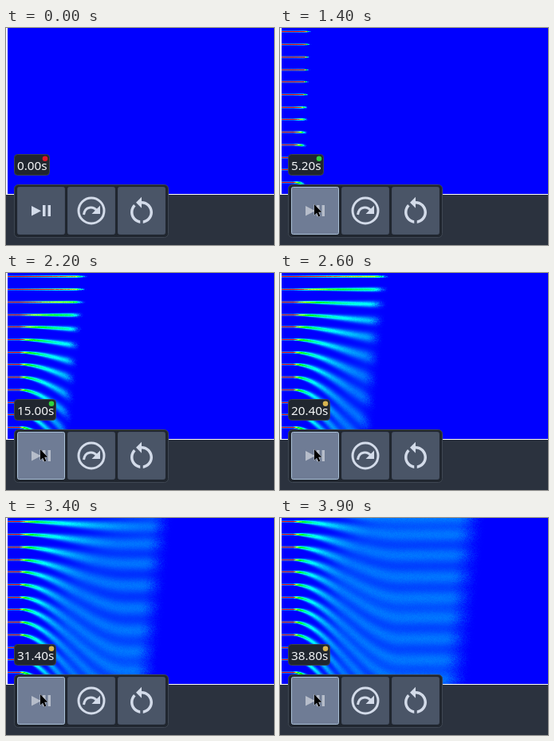
Write an HTML page with a canvas that moves like this. It is 336 px wide and 272 px high and loops after 4000 ms.

```html
<!DOCTYPE html>
<html lang="en">
<head>
<meta charset="utf-8">
<style>
  html, body { margin: 0; width: 100%; height: 100%; overflow: hidden; background: #2b323e; }
  canvas { display: block; width: 336px; height: 272px; }
</style>
</head>
<body>
<canvas id="stage" width="336" height="272"></canvas>
<script>
const ctx = document.getElementById('stage').getContext('2d');
const FIELD_W = 334, FIELD_H = 208;
const field = ctx.createImageData(FIELD_W, FIELD_H);
const ICON = '#d3dbe9';
// Inlets down the left edge; the first two lie above the visible area
const inlets = Array.from({ length: 15 }, (_, i) => Math.round(4.35 + (i - 2) * 15.72));
// [loop seconds, simulated seconds]
const clock = [[0, 0], [0.9, 0], [1.4, 5.2], [2.2, 15], [3, 25.8], [3.4, 31.4], [3.9, 38.8]];
const restart = new Path2D('M12 5V2L8 6l4 4V7c3.31 0 6 2.69 6 6 0 2.97-2.17 5.43-5 5.91v2.02c3.95-.49 7-3.85 7-7.93 0-4.42-3.58-8-8-8zM6 13c0-1.65.67-3.15 1.76-4.24L6.34 7.34C4.9 8.79 4 10.79 4 13c0 4.08 3.05 7.44 7 7.93v-2.02c-2.83-.48-5-2.94-5-5.91z');
const pointer = new Path2D('M0 0V13.5L3 10.7L5.1 15.4L7.3 14.4L5.3 9.8H9.2Z');

const clamp = (v, lo = 0, hi = 1) => Math.min(hi, Math.max(lo, v));
const smooth = (a, b, v) => { const u = clamp((v - a) / (b - a)); return u * u * (3 - 2 * u); };
const grain = (x, y) => { const n = Math.sin(x * 12.99 + y * 78.23) * 43758.5; return n - Math.floor(n) - 0.5; };

function simTime(t) {
  const i = Math.max(1, clock.findIndex(p => p[0] >= t - 1e-6));
  const [a, va] = clock[i - 1], [b, vb] = clock[i];
  return Math.round((va + (vb - va) * (t - a) / (b - a)) * 5) / 5;
}

// Centre, spread and peak of each jet where it crosses column x
function jetsAt(x, time) {
  const bend = smooth(15, 150, x);
  const sink = 17 * (Math.max(0, time - 20) / 19) ** 2;
  return inlets.map(y0 => {
    const pull = 0.65 * clamp((time - 15) / 20 + (y0 - 50) / 120);
    const mixing = clamp((time - 20) / 20 + y0 / 95, 0.06, 1.5);
    const width = Math.min(5.2, 0.45 + 0.05 * mixing * Math.max(0, x - 14));
    return {
      y: y0 + bend * (sink + pull * (y0 - 4)),
      spread: width * (1 + bend * pull),
      peak: 0.58 / width
    };
  });
}

function drawField(time) {
  const px = field.data;
  const soft = 3 + time * 0.4;
  for (let x = 0; x < FIELD_W; x++) {
    const front = time * 6.1 - x;
    const jets = front > -2 * soft ? jetsAt(x, time) : [];
    for (let y = 0; y < FIELD_H; y++) {
      const reach = time && smooth(-soft, soft, front - y * Math.min(0.1, time / 150) + grain(x, y) * soft * 0.4);
      let v = 0;
      if (reach) {
        for (const jet of jets) {
          const d = (y - jet.y) / jet.spread;
          if (d * d < 12) v += jet.peak * Math.exp(-0.5 * d * d);
        }
      }
      v = 4 * clamp(v * reach * (1 + 0.12 * grain(y, x)));
      const i = 4 * (y * FIELD_W + x);
      px[i] = 255 * clamp(v - 2);
      px[i + 1] = 255 * clamp(Math.min(v, 4 - v));
      px[i + 2] = 255 * clamp(2 - v);
      px[i + 3] = 255;
    }
  }
  ctx.putImageData(field, 2, 0);
}

function box(x, y, w, h, r, fill, stroke) {
  ctx.beginPath();
  ctx.roundRect(x + 0.5, y + 0.5, w - 1, h - 1, r);
  ctx.fillStyle = fill;
  ctx.fill();
  ctx.strokeStyle = stroke;
  ctx.lineWidth = 1;
  ctx.stroke();
}

function poly(...p) {
  ctx.beginPath();
  for (let i = 0; i < p.length; i += 2) ctx.lineTo(p[i], p[i + 1]);
  ctx.fill();
}

function drawLabel(time) {
  const text = time.toFixed(2) + 's';
  ctx.font = '15.3px "Noto Sans", "Open Sans", sans-serif';
  const w = Math.round(ctx.measureText(text).width) + 7;
  box(10, 158, w, 27, 4, '#20262f', '#3b434f');
  ctx.fillStyle = '#f4f6f8';
  ctx.fillText(text, 14, 178);
  ctx.fillStyle = !time ? '#e0152b' : time < 20 ? '#2fd23f' : '#d8b450';
  ctx.beginPath();
  ctx.arc(10 + w - 6, 163.8, 3.3, 0, 7);
  ctx.fill();
}

function drawPanel(cx, cy) {
  box(10, 196, 194, 67, 5, '#20262f', '#3f4753');
  for (const x of [14, 77, 140]) {
    const hover = cx >= x && cx < x + 60 && cy >= 199 && cy < 259;
    box(x, 199, 60, 60, 2, hover ? '#6f7c95' : '#4a5567', hover ? '#a9bfd6' : '#465063');
  }
  const pressed = cx < 74 && cy < 259;
  ctx.fillStyle = pressed ? '#b6bdca' : ICON;
  poly(32, 223, 44, 229.3, 32, 235.5);
  ctx.fillRect(46, 222, 3.5, 14);
  ctx.fillRect(52.5, 222, 3.5, 14);

  ctx.fillStyle = ctx.strokeStyle = ICON;
  ctx.lineWidth = 3;
  ctx.beginPath();
  ctx.arc(107, 229, 16, 0, 7);
  ctx.stroke();
  ctx.beginPath();
  ctx.moveTo(97.5, 234);
  ctx.bezierCurveTo(99, 223.5, 109, 222.5, 115, 230);
  ctx.stroke();
  poly(118, 222.5, 118, 233, 107.5, 233);

  ctx.save();
  ctx.translate(149, 208.25);
  ctx.scale(1.75, 1.75);
  ctx.fill(restart);
  ctx.restore();
}

function drawPointer(x, y) {
  ctx.save();
  ctx.translate(x, y);
  ctx.strokeStyle = 'rgba(255,255,255,.5)';
  ctx.lineWidth = 1;
  ctx.stroke(pointer);
  ctx.fillStyle = '#000';
  ctx.fill(pointer);
  ctx.restore();
}

function draw(t) {
  const time = simTime(t);
  const move = smooth(0, 0.6, t);
  const cx = 196 - 153 * move, cy = 274 - 53 * move;
  ctx.fillStyle = '#2b323e';
  ctx.fillRect(0, 0, 336, 272);
  ctx.fillStyle = '#fff';
  ctx.fillRect(0, 0, 2, 209);
  ctx.fillRect(0, 208, 336, 1);
  drawField(time);
  drawLabel(time);
  drawPanel(cx, cy);
  drawPointer(cx, cy);
}

let start, lastStep;
function tick(now) {
  start ??= now;
  const step = Math.floor((now - start) % 4000 / 100);
  if (step !== lastStep) draw((lastStep = step) / 10);
  requestAnimationFrame(tick);
}
requestAnimationFrame(tick);
</script>
</body>
</html>
```
